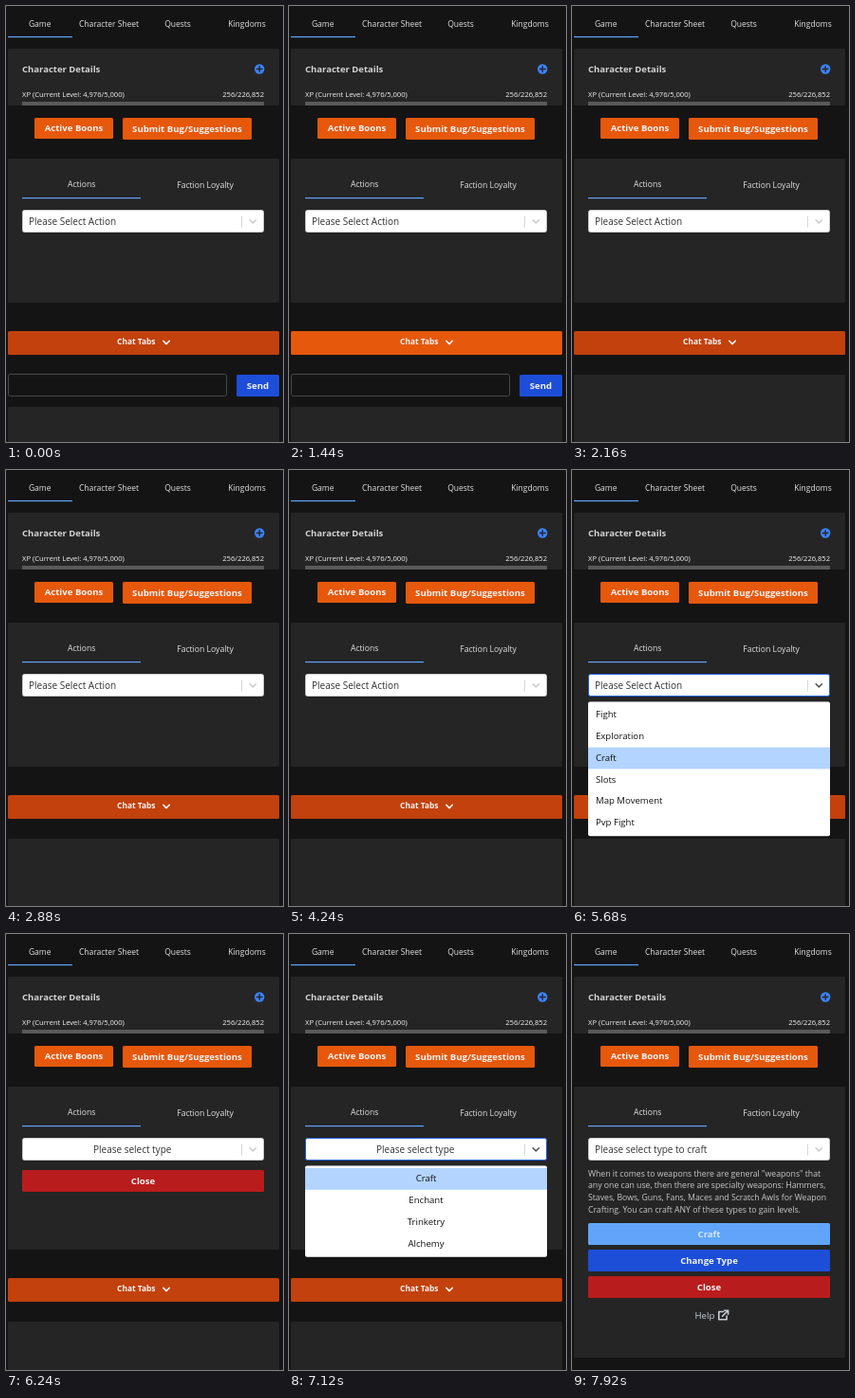
An HTML page that plays this animation: 292 px wide and 460 px high, repeating every 8000 ms.

```html
<!DOCTYPE html>
<html lang="en">
<head>
<meta charset="utf-8">
<title>Game actions</title>
<style>
  html, body { margin: 0; width: 100%; height: 100%; overflow: hidden; background: #141414; }
  svg { display: block; width: 292px; height: 460px; font-family: "Open Sans", "Noto Sans", sans-serif; }
</style>
</head>
<body>
<svg id="stage" viewBox="0 0 292 460"></svg>
<script>
const LOOP = 8000;
const stage = document.getElementById('stage');

const PANEL = '#252525', LIGHT = '#e2e2e2', TAB_BLUE = '#60a5fa';
const ORANGE = [230, 88, 12], ORANGE_HOVER = [194, 65, 12];
const BLUE = '#1d4ed8', RED = '#b91c1c';

const ACTIONS = ['Fight', 'Exploration', 'Craft', 'Slots', 'Map Movement', 'Pvp Fight'];
const CRAFT_TYPES = ['Craft', 'Enchant', 'Trinketry', 'Alchemy'];
const CRAFT_HELP = [
  'When it comes to weapons there are general "weapons" that',
  'any one can use, then there are specialty weapons: Hammers,',
  'Staves, Bows, Guns, Fans, Maces and Scratch Awls for Weapon',
  'Crafting. You can craft ANY of these types to gain levels.'
];

const ramp = (t, start, length) => Math.min(1, Math.max(0, (t - start) / length));
const mix = (a, b, k) => `rgb(${a.map((v, i) => Math.round(v + (b[i] - v) * k))})`;

const rect = (x, y, w, h, fill, extra = '') =>
  `<rect x="${x}" y="${y}" width="${w}" height="${h}" fill="${fill}" ${extra}/>`;
const line = (d, color, width = 1) =>
  `<path d="${d}" fill="none" stroke="${color}" stroke-width="${width}" stroke-linecap="round" stroke-linejoin="round"/>`;
const text = (str, x, y, size, fill = LIGHT, anchor = 'start', weight = 400) =>
  `<text x="${x}" y="${y}" font-size="${size}" fill="${fill}" text-anchor="${anchor}" font-weight="${weight}">${str}</text>`;
const panel = (y, h) => rect(2, y, 286, h, PANEL, 'rx="1.5"');
const chevron = (x, y, color, r = 3.2) =>
  line(`M${x - r} ${y - r / 2}l${r} ${r}l${r} ${-r}`, color, 1.5);
const button = (label, x, y, w, h, fill, color = '#f4f4f4') =>
  rect(x, y, w, h, fill, 'rx="1.5"') +
  text(label, x + w / 2, y + h / 2 + 3.1, 9.6, color, 'middle', 700);

function header() {
  const orange = mix(ORANGE, ORANGE_HOVER, 0);
  return text('Game', 35.7, 21.7, 8.5, LIGHT, 'middle') +
    text('Character Sheet', 108.5, 22, 8.5, LIGHT, 'middle') +
    text('Quests', 181, 22, 8.5, LIGHT, 'middle') +
    text('Kingdoms', 254, 22, 8.5, LIGHT, 'middle') +
    rect(2, 32, 68, 1.2, TAB_BLUE) +
    panel(45, 60) +
    text('Character Details', 17, 70, 9.5, '#d4d4d4', 'start', 700) +
    '<circle cx="267.2" cy="66.5" r="5.2" fill="#3b82f6"/>' +
    line('M264.4 66.5h5.6M267.2 63.7v5.6', PANEL, 1.4) +
    text('XP (Current Level: 4,976/5,000)', 17, 96, 7.6, '#f4f4f4') +
    text('256/226,852', 272, 96, 7.6, '#f4f4f4', 'end') +
    rect(17, 101, 255, 4, '#5a5a5a') +
    button('Active Boons', 30, 118, 83, 22, orange) +
    button('Submit Bug/Suggestions', 123, 118, 136, 23, orange);
}

function actionTabs() {
  return text('Actions', 79.7, 191.3, 8.65, LIGHT, 'middle') +
    text('Faction Loyalty', 210, 192, 8.65, LIGHT, 'middle') +
    rect(17, 202, 125, 1.2, TAB_BLUE);
}

function select(label, focused, centered) {
  const border = focused ? '#2563eb' : '#ccc';
  return rect(17.5, 215.5, 254, 23, '#fff', `rx="2" stroke="${border}"`) +
    text(label, centered ? 133.2 : 24, 230.6, 10, '#333', centered ? 'middle' : 'start') +
    rect(248, 221.5, 0.8, 12, '#ccc') +
    chevron(260.3, 227.3, focused ? '#555' : '#ccc');
}

function menu(options, active, pressed, centered) {
  const row = 22.8, top = 247;
  return rect(17, 244.5, 255, options.length * row + 5, '#fff', 'rx="2"') +
    options.map((label, i) =>
      (i === active ? rect(17, top + i * row, 255, row, pressed ? '#b2d4ff' : '#dbe8fa') : '') +
      text(label, centered ? 144.5 : 25, top + i * row + 14.2, 9.6, '#111', centered ? 'middle' : 'start')
    ).join('');
}

function chat(top, hover, hasInput) {
  const below = top + 46;
  let out = rect(2, top, 286, 25, mix(ORANGE, ORANGE_HOVER, hover), 'rx="1.5"') +
    text('Chat Tabs', 137.3, top + 14, 8.4, '#f4f4f4', 'middle', 700) +
    chevron(169, top + 12, '#f4f4f4');
  if (hasInput) {
    out += rect(2.5, below - 0.5, 230, 23, '#141414', 'rx="2" stroke="#484848"') +
      button('Send', 243, below, 45, 23, BLUE);
  }
  const panelTop = hasInput ? below + 34 : below;
  return out + panel(panelTop, 470 - panelTop);
}

function craftForm() {
  return select('Please select type to craft', false, false) +
    CRAFT_HELP.map((str, i) => text(str, 17, 255.7 + i * 12.7, 8.7, '#c8c8c8')).join('') +
    button('Craft', 17, 305, 255, 23, TAB_BLUE, '#d5e6fd') +
    button('Change Type', 17, 333, 255, 23, BLUE) +
    button('Close', 17, 361, 255, 23, RED) +
    text('Help', 129.5, 405.7, 9.6, '#c8cfd8') +
    line('M159.5 398.5h-4.7v8.3h8.3v-3.8M158.5 403.3l6-6M160.6 397.2h4v4', '#c8cfd8', 1.6);
}

function scene(t) {
  let out = header();
  if (t < 5760) {
    const hover = t < 1600 ? 1 - ramp(t, 1040, 240) : ramp(t, 1700, 150);
    const open = t >= 4320;
    const active = t < 4800 ? 0 : t < 4960 ? 1 : 2;
    out += panel(161, 152) + actionTabs() + chat(343, hover, t < 2000) +
      select('Please Select Action', open, false);
    if (open) out += menu(ACTIONS, active, t >= 5600, false);
  } else if (t < 7520) {
    const open = t >= 6480 && t < 7440;
    out += panel(161, 172) + actionTabs() + chat(363, 1, false) +
      select('Please select type', open, true) +
      button('Close', 17, 249, 255, 23, RED);
    if (open) out += menu(CRAFT_TYPES, 0, t >= 7120, true);
  } else {
    out += panel(161, 286) + actionTabs() + craftForm();
  }
  return out;
}

let shown = '';
function draw() {
  const next = scene(performance.now() % LOOP);
  if (next !== shown) stage.innerHTML = shown = next;
  requestAnimationFrame(draw);
}
draw();
</script>
</body>
</html>
```
